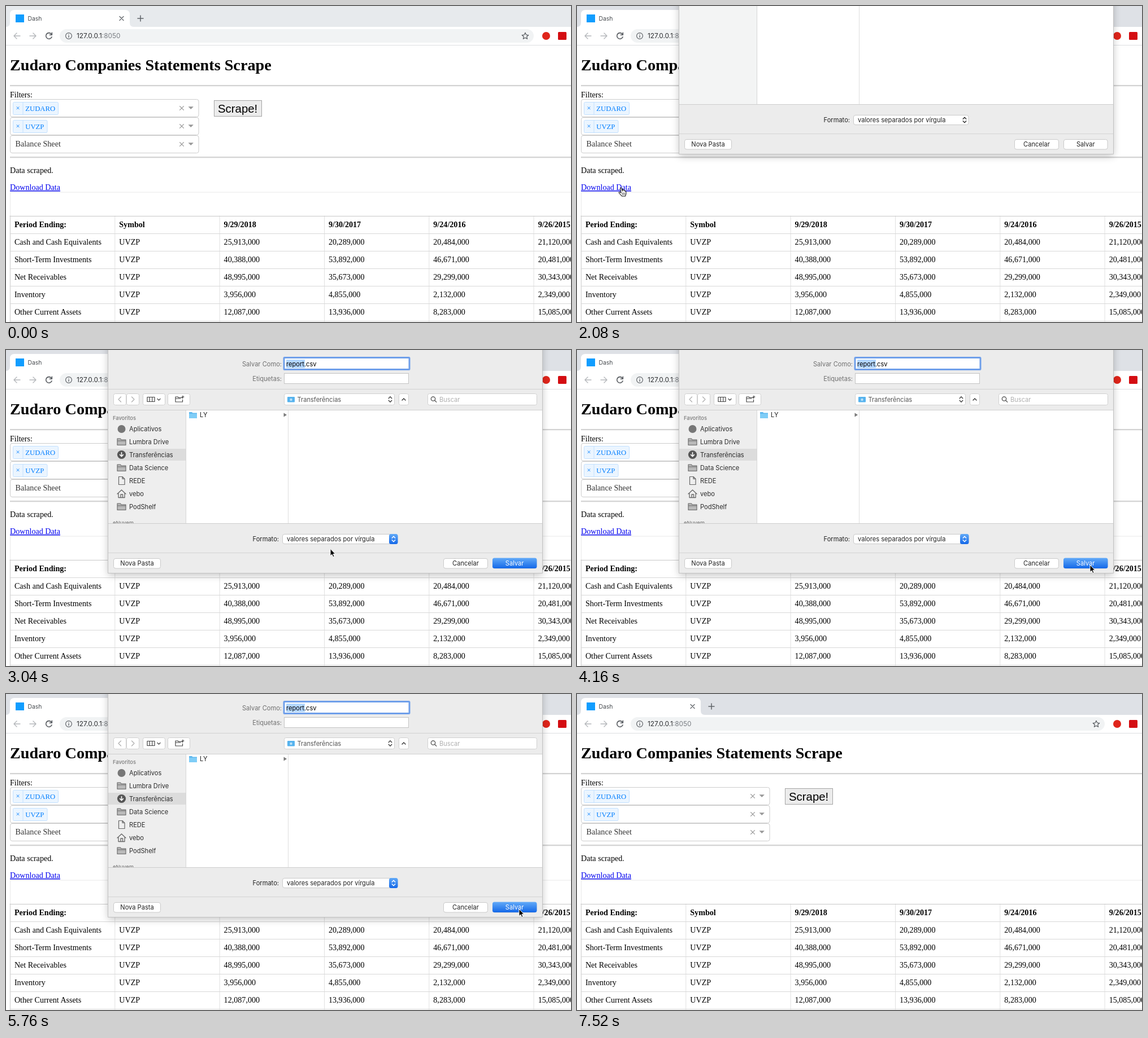
Write an HTML page that moves like this. It is 1000 px wide and 560 px high and loops after 8 s.

```html
<!DOCTYPE html>
<html lang="en">
<head>
<meta charset="utf-8">
<title>Statements scrape</title>
<style>
  html, body { margin: 0; width: 100%; height: 100%; overflow: hidden; background: #fff; }
  svg { display: block; width: 100vw; height: 100vh; }
  text { white-space: pre; }
  .serif { font-family: "Liberation Serif", serif; font-size: 14.11px; }
  .ui { font-family: Inter, sans-serif; font-size: 11.1px; }
  .line { fill: none; stroke-linecap: round; stroke-linejoin: round; }
  .idle .live, .active .rest { display: none; }
  .sheet { filter: drop-shadow(0 3px 7px rgba(0, 0, 0, .24)); }
  .idle { --control: #e6e6e6; --edge: #dfdfdf; --ink: #b0b0b0; --dark: #b4b4b4; --side: #f3f4f4; --mark: #dcdcdc; }
  .active { --control: #fff; --edge: #d0d0d0; --ink: #555; --dark: #444; --side: #eeeeee; --mark: #b3d7ff; }
  .control { fill: var(--control); stroke: var(--edge); }
  .dark { stroke: var(--dark); stroke-width: 1.2; }
</style>
</head>
<body>
<svg id="stage" viewBox="0 0 1000 560" preserveAspectRatio="none"></svg>
<script>
const LOOP = 8000, STEP = 160;

const rect = (x, y, w, h, fill, more = '') =>
  `<rect x="${x}" y="${y}" width="${w}" height="${h}" fill="${fill}" ${more}/>`;
const box = (x, y, w, h, r = 3) =>
  `<rect class="control" x="${x + .5}" y="${y + .5}" width="${w - 1}" height="${h - 1}" rx="${r}"/>`;
const line = (d, stroke, width = 1, more = '') =>
  `<path class="line" d="${d}" stroke="${stroke}" stroke-width="${width}" ${more}/>`;
const shape = (d, fill, more = '') => `<path d="${d}" fill="${fill}" ${more}/>`;
const dark = d => `<path class="line dark" d="${d}"/>`;
const disc = (x, y, r, fill, more = '') => `<circle cx="${x}" cy="${y}" r="${r}" fill="${fill}" ${more}/>`;
const write = (family, x, y, words, fill = '#000', more = '') =>
  `<text class="${family}" x="${x}" y="${y}" fill="${fill}" ${more}>${words}</text>`;
const serif = (...a) => write('serif', ...a);
const ui = (...a) => write('ui', ...a);
const cross = (x, y, r, color, width = 1.2) =>
  line(`M${x - r} ${y - r}l${2 * r} ${2 * r}m0 ${-2 * r}l${-2 * r} ${2 * r}`, color, width);
const END = 'text-anchor="end"', MIDDLE = 'text-anchor="middle"', BOLD = 'font-weight="700"';

function browser() {
  return rect(0, 0, 1000, 37, '#dee1e6', 'id="strip"') +
    shape('M0 37Q7 37 7 29V15Q7 7 15 7H211Q219 7 219 15V29Q219 37 226 37Z', '#fff') +
    rect(17, 15, 15, 14, '#119dff') +
    ui(38.5, 26, 'Dash', '#45494d', 'style="font-size:10.4px"') +
    cross(204.5, 22, 3.5, '#5f6368', 1.3) +
    line('M238 17v10m-5-5h10', '#5f6368', 1.5) +
    rect(0, 37, 1000, 32, '#fff') + rect(0, 69, 1000, 1, '#dcdee1') +
    line('M25 53H14m5-5l-5 5 5 5M42 53h11m-5-5l5 5-5 5', '#b4b7ba', 1.4) +
    line('M80 49.5a5.3 5.3 0 1 0 1 5.2M81.3 47.3v4h-4', '#55595e', 1.6) +
    rect(95, 41, 839, 24, '#f1f3f4', 'rx="12"') +
    disc(111, 53, 5.4, 'none', 'stroke="#5f6368" stroke-width="1.2"') +
    line('M111 52.5v3M111 50.2v.1', '#5f6368', 1.3) +
    ui(125, 57.3, '127.0.0.1<tspan fill="#777b80">:8050</tspan>', '#2a2c2f', 'style="font-size:11.8px"') +
    line('M919 47.3l1.7 3.8 4.1.4-3.1 2.8.9 4-3.6-2.1-3.6 2.1.9-4-3.1-2.8 4.1-.4z', '#55595e', 1.2) +
    disc(956, 53, 7, '#e0251b') + rect(977, 46, 15, 14, '#d40d12', 'rx="1.5"');
}

function dropdown(y, tag, width) {
  const inside = width
    ? rect(12.5, y + 5.5, width, 22, '#ebf5ff', 'rx="2" stroke="#c2e0ff"') +
      line(`M30 ${y + 6}v21`, '#c2e0ff') +
      serif(21, y + 20.3, '×', '#007eff', `${MIDDLE} style="font-size:12.7px"`) +
      serif(34.3, y + 20.5, tag, '#007eff', 'style="font-size:12.7px"')
    : serif(16.5, y + 20, tag, '#333');
  return rect(7.5, y + .5, 333.5, 31, '#fff', 'rx="3.5" stroke="#ccc"') + inside +
    cross(311, y + 16, 3.4, '#999', 1.3) +
    shape(`M322.5 ${y + 13.3}h9.4l-4.7 4.8z`, '#999');
}

function table() {
  const rows = [
    ['Period Ending:', 'Symbol', '9/29/2018', '9/30/2017', '9/24/2016', '9/26/2015'],
    ['Cash and Cash Equivalents', 'UVZP', '25,913,000', '20,289,000', '20,484,000', '21,120,000'],
    ['Short-Term Investments', 'UVZP', '40,388,000', '53,892,000', '46,671,000', '20,481,000'],
    ['Net Receivables', 'UVZP', '48,995,000', '35,673,000', '29,299,000', '30,343,000'],
    ['Inventory', 'UVZP', '3,956,000', '4,855,000', '2,132,000', '2,349,000'],
    ['Other Current Assets', 'UVZP', '12,087,000', '13,936,000', '8,283,000', '15,085,000']
  ];
  const columnX = c => 7.4 + c * 185.35;
  let out = line('M1000 330H7.4V372', '#e8e8e8');
  for (let c = 0; c < 6; c++) out += line(`M${columnX(c)} 372V560`, c ? '#e0e0e0' : '#c8c8c8');
  for (let r = 0; r < 7; r++) out += line(`M7 ${372.5 + Math.round(r * 30.95)}H1000`, r ? '#d8d8d8' : '#c8c8c8');
  rows.forEach((row, r) => row.forEach((cell, c) => {
    out += serif(columnX(c) + 7.5, 392 + r * 31, cell, '#000', r ? '' : BOLD);
  }));
  return out;
}

function page() {
  const rule = y => rect(7, y, 993, 1, '#9c9c9c') + rect(7, y + 1, 993, 1, '#e6e6e6');
  return rect(0, 70, 1000, 490, '#fff') +
    serif(7, 114, 'Zudaro Companies Statements Scrape', '#000', `${BOLD} style="font-size:28.22px"`) +
    rule(140.5) + serif(7, 162, 'Filters:') +
    dropdown(165, 'ZUDARO', 80) + dropdown(197, 'UVZP', 60.5) + dropdown(229, 'Balance Sheet') +
    rect(368.5, 167.5, 84, 28, '#ececec', 'stroke="#a4a4a4"') +
    `<text x="375" y="189" font-family="Liberation Sans, sans-serif" font-size="20.4">Scrape!</text>` +
    rule(267.5) + serif(7, 296, 'Data scraped.') +
    serif(7, 326, 'Download Data', '#0000ee', 'text-decoration="underline"') +
    table();
}

const folder = (x, y, stroke) =>
  shape(`M${x} ${y + 11.5}V${y}h5.5l1.5 2H${x + 15}V${y + 11.5}z`, '#b9b9b9') +
  line(`M${x} ${y + 11.5}V${y}h5.5l1.5 2H${x + 15}V${y + 11.5}zM${x} ${y + 4}h15`, stroke, 1.1);
const chevrons = (x, y, color) =>
  line(`M${x - 2.8} ${y - 1.8}l2.8-3 2.8 3m0 3.6l-2.8 3-2.8-3`, color, 1.4);

function sidebar() {
  const ink = '#666';
  const names = ['Aplicativos', 'Lumbra Drive', 'Transferências', 'Data Science', 'REDE', 'vebo', 'PodShelf'];
  const small = 'font-weight="500" style="font-size:9.3px"';
  let out = rect(181, 175, 137, 21, '#dcdcdc') + ui(189, 123.5, 'Favoritos', '#7b7b7b', small);
  names.forEach((name, i) => { out += ui(218, 144 + i * 22.95, name, '#2b2b2b'); });
  out += disc(204.5, 140, 7, '#777') +
    [157, 203, 272].map(y => folder(197, y, ink)).join('') +
    disc(204.5, 185.5, 7.6, '#555') + line('M204.5 181.5v7m-3-3l3 3.2 3-3.2', '#fff', 1.6) +
    line('M199.5 224.5h6.5l4 4v10h-10.5zM206 224.5v4h4', ink, 1.2) +
    line('M197 255l7.5-7 7.5 7M199 254v7.5h11V254M203 261v-5h3.5v5', ink, 1.3);
  return out + ui(189, 309.5, 'eNuvem', '#7b7b7b', small);
}

function pushButton(x, w, label) {
  return rect(x + .5, 369.5, w - 1, 17.5, '#fff', 'rx="3.5" stroke="#cacaca"') +
    ui(x + w / 2, 382, label, '#222', MIDDLE);
}

function dialog() {
  const live = s => `<g class="live">${s}</g>`, rest = s => `<g class="rest">${s}</g>`;
  return rect(181, -30, 768, 426, '#ececec', 'class="sheet"') +
    line('M180.5 0V395.5H949.5V0', '#c2c2c2') +
    rect(181, 69, 768, 1, '#d2d2d2') + rect(181, 106, 768, 1, '#cfcfcf') +
    rect(181, 107, 137, 200, 'var(--side)') + rect(318, 107, 1, 200, '#d6d6d6') +
    rect(319, 107, 630, 200, '#fff') + rect(499, 107, 1, 200, '#dedede') +
    rect(181, 307, 768, 1, '#cdcdcd') + rect(181, 359, 768, 1, '#d4d4d4') +
    ui(488, 28.5, 'Salvar Como:', '#707070', END) + ui(488, 55, 'Etiquetas:', '#707070', END) +
    rect(492.5, 14.5, 220, 19, '#fff', 'stroke="#c4c4c4"') +
    live(rect(492, 13.5, 222, 21, '#fff', 'rx="1" stroke="#6f9fea" stroke-width="3"')) +
    rect(496, 17, 33, 15, 'var(--mark)') + ui(496, 29, 'report.csv') +
    rect(492.5, 41.5, 220, 18, '#fff', 'stroke="#c4c4c4"') +
    box(190, 77, 23, 21) + box(213, 77, 23, 21) + box(242, 77, 40, 21) + box(286, 77, 40, 21) +
    line('M203.5 83l-4.5 4.5 4.5 4.5M222.5 83l4.5 4.5-4.5 4.5', '#adadad', 1.2) +
    dark('M250 83.5h13v8h-13zM254.3 83.5v8M258.7 83.5v8M268 86.5l2.5 2.5 2.5-2.5') +
    dark('M309 92h-9v-9h4l1.5 1.5h7v1M300 86h9M309 92h3.5v-4M313 81v4m-2-2h4') +
    box(492, 77, 196, 21) +
    rect(498, 83, 13, 9.5, '#56b3ee', 'rx="1" class="live"') +
    rect(498, 83, 13, 9.5, '#c4c4c4', 'rx="1" class="rest"') +
    disc(504.5, 88, 2.2, '#fff', 'opacity=".6"') +
    ui(515.5, 91.5, 'Transferências', 'var(--ink)') + chevrons(680, 87.5, 'var(--dark)') +
    rect(695.5, 77.5, 17, 20, '#fff', 'rx="3" stroke="#d0d0d0"') +
    line('M701 89l3-3 3 3', '#333', 1.4) +
    box(746, 77, 194, 21) +
    `<circle class="dark" cx="756" cy="86.5" r="3.7" fill="none"/>` + dark('M758.8 89.3l3 3') +
    ui(767, 91.5, 'Buscar', '#b0b0b0') +
    live(`<g clip-path="url(#sideClip)">${sidebar()}</g>` +
      shape('M324 110h5l1.5 1.5H338V121H324z', '#62b9ee') + rect(324, 113, 14, 8, '#7fcdf7', 'rx="1"') +
      ui(343, 119, 'LY', '#222') + shape('M491.5 111.5l5.5 3.5-5.5 3.5z', '#7a7a7a')) +
    ui(483, 338.5, 'Formato:', '#222', END) +
    rect(489.5, 326.5, 203.5, 17, '#fff', 'rx="3.5" stroke="#cacaca"') +
    ui(497, 339, 'valores separados por vírgula', '#222') +
    live(rect(678, 326, 15.5, 18, 'url(#blue)', 'rx="3.5"') + chevrons(686, 335, '#fff')) +
    rest(chevrons(686, 335, '#333')) +
    pushButton(190, 84, 'Nova Pasta') + pushButton(774, 79, 'Cancelar') + pushButton(861, 78.5, 'Salvar') +
    live(rect(861, 368.5, 78.5, 18.5, 'url(#blue)', 'rx="3.5" id="save"') +
      ui(900.2, 382, 'Salvar', '#fff', MIDDLE));
}

const pointer =
  `<g id="pointer"><g id="arrow">` +
    shape('M0 0V12.5L2.9 9.9 4.9 14.5 7 13.6 5 9.2H8.8Z', '#000', 'stroke="#fff" stroke-width="1"') +
  `</g><g id="hand">` +
    shape('M-1.5 1Q-.5-.8.8 1L2.3 5.5Q4 0 5 5Q6.5 4.3 7 6Q8.5 5.5 8.8 7.5V11L7.5 15H1.5L-3.5 9.5Q-4.5 7.3-2.5 7.8L0 9Z', '#fff', 'stroke="#111" stroke-width="1.1"') +
    line('M2.3 9v3.5m2-3.5v3.5m2-3.5v3.5', '#333', .8) +
  `</g><g id="ring">` +
    disc(3, 5, 13.2, 'none', 'stroke="#fff" stroke-width="1.4" opacity=".8"') +
    disc(3, 5, 14.4, 'none', 'stroke="#222" stroke-width="1.2"') +
  `</g></g>`;

const byId = id => document.getElementById(id);
byId('stage').innerHTML =
  `<defs><linearGradient id="blue" x2="0" y2="1"><stop stop-color="#62aaf8"/><stop offset="1" stop-color="#1468e8"/></linearGradient>
   <clipPath id="sideClip"><rect x="181" y="107" width="137" height="200"/></clipPath></defs>` +
  browser() + page() + `<g id="dialog">${dialog()}</g>` + pointer;

const [strip, sheet, save, cursor, arrow, hand, ring] =
  ['strip', 'dialog', 'save', 'pointer', 'arrow', 'hand', 'ring'].map(byId);

// Pointer stops: time, x, y
const path = [
  [320, 183, 399], [1280, 78, 322], [2400, 78, 322], [3520, 896, 372],
  [4160, 908, 381], [7200, 908, 381], [7360, 512, 521]
];
// Sheet offsets, each held until the next
const slide = [[0, null], [1920, -370], [2080, -133], [2240, 0], [5920, -365], [6080, null]];

function pointerAt(t) {
  const next = path.findIndex(p => p[0] >= t);
  if (next <= 0) return path[0].slice(1);
  const [t0, x0, y0] = path[next - 1], [t1, x1, y1] = path[next];
  const u = (t - t0) / (t1 - t0), k = u * u * (3 - 2 * u);
  return [x0 + (x1 - x0) * k, y0 + (y1 - y0) * k];
}

const show = (node, on) => { node.style.display = on ? '' : 'none'; };

function render(now) {
  const t = Math.floor((now % LOOP) / STEP) * STEP;
  const offset = slide.filter(s => s[0] <= t).pop()[1];
  show(sheet, offset !== null);
  sheet.setAttribute('transform', `translate(0 ${offset || 0})`);
  sheet.setAttribute('class', t < 2560 ? 'idle' : 'active');
  strip.setAttribute('fill', t < 1440 ? '#e7eaed' : '#dee1e6');
  save.setAttribute('fill', t === 5600 ? '#2f84ee' : 'url(#blue)');

  const visible = t >= 320 && t < 7520;
  show(cursor, visible);
  if (visible) {
    const [x, y] = pointerAt(t);
    const onLink = t < 2240 && x < 96 && y < 328;
    cursor.setAttribute('transform', `translate(${x} ${y})`);
    show(hand, onLink);
    show(arrow, !onLink);
    show(ring, t === 1440 || t === 5600);
  }
}

const start = performance.now();
function tick() {
  render(performance.now() - start);
  requestAnimationFrame(tick);
}
tick();
</script>
</body>
</html>
```
